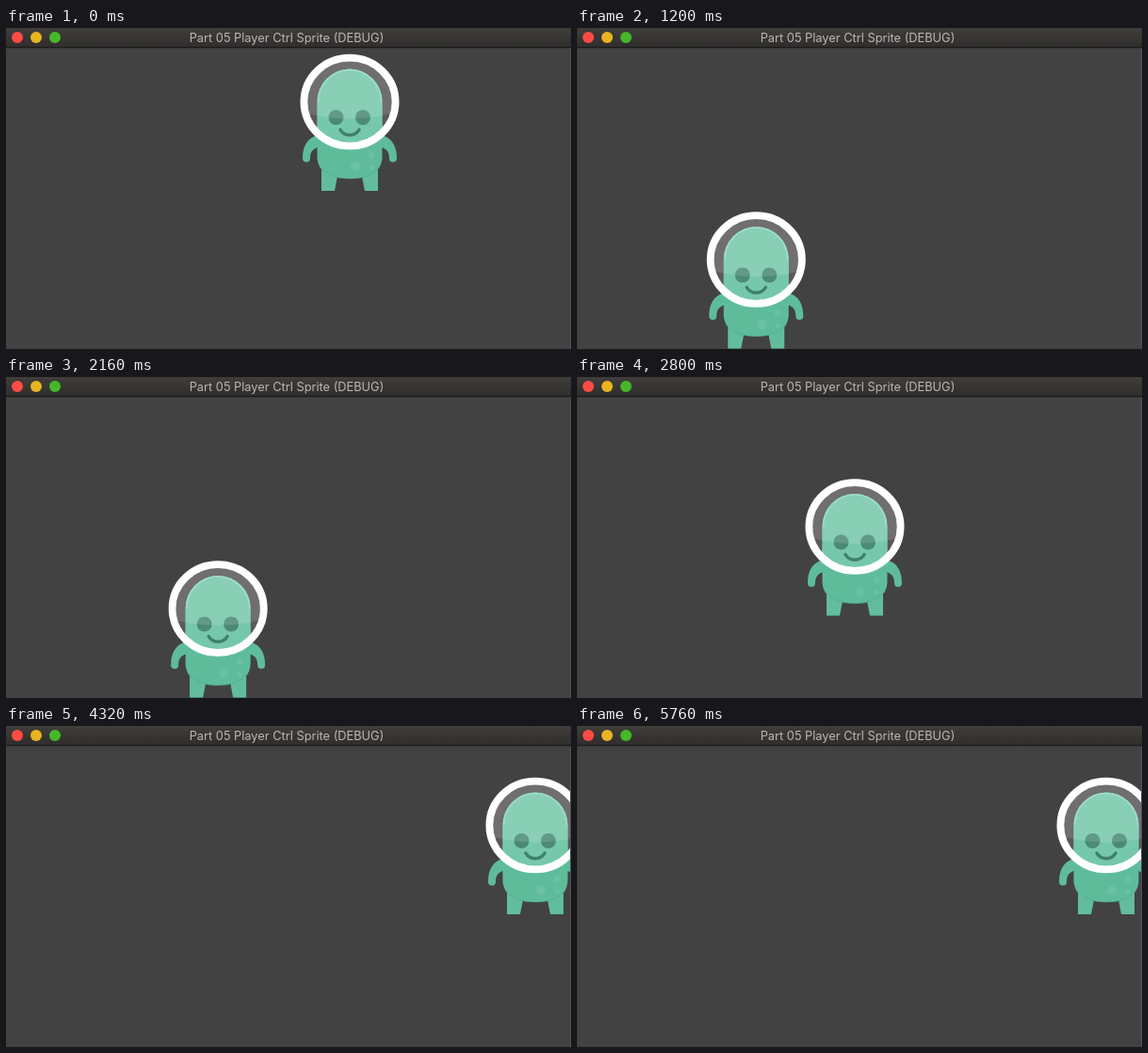
Animation of 600 by 341 pixels, one loop 5.84 s. Source, as an HTML page:

```html
<!DOCTYPE html>
<html lang="en">
<head>
<meta charset="utf-8">
<title>Player sprite</title>
<style>
  html, body { margin: 0; width: 100%; height: 100%; overflow: hidden; background: #424242; }
  svg { display: block; width: 600px; height: 341px; }
  text { font: 12.8px Inter, sans-serif; fill: #bab7b5; text-anchor: middle; }
</style>
</head>
<body>
<svg viewBox="0 0 600 341">
  <defs>
    <linearGradient id="bar" x2="0" y2="1">
      <stop stop-color="#403d3b"/>
      <stop offset="1" stop-color="#302e2c"/>
    </linearGradient>
    <clipPath id="glass"><ellipse rx="46" ry="45"/></clipPath>
    <path id="arm" d="M-33 35C-45 38-50 47-50 60A4 4 0 0 0-42 60C-42 54-40 50-33 48Z" fill="#5fbc9b"/>
    <path id="leg" d="M-30 66H-10.5L-16 94.5H-30Z" fill="#62bd9d"/>
  </defs>
  <rect width="600" height="341" fill="#424242"/>

  <!-- origin is the centre of the helmet -->
  <g id="player">
    <ellipse rx="48" ry="47" fill="#5b5858"/>
    <use href="#arm"/>
    <use href="#arm" transform="scale(-1 1)"/>
    <use href="#leg"/>
    <use href="#leg" transform="scale(-1 1)"/>
    <path d="M-34.5 0A34.5 35 0 0 1 34.5 0V58C34.5 74 21 81.5 0 81.5S-34.5 74-34.5 58Z" fill="#5fbc9b"/>
    <path d="M-32 69Q-22 81.5 0 81.5T32 69" fill="none" stroke="#51a78a" stroke-opacity=".6"/>
    <g fill="#83cbb2" opacity=".35">
      <circle cx="6" cy="69" r="5"/>
      <circle cx="23" cy="57" r="3.5"/>
      <circle cx="23" cy="70" r="2.5"/>
    </g>
    <g clip-path="url(#glass)">
      <path d="M-34.5 0A34.5 35 0 0 1 34.5 0V52H-34.5Z" fill="#76c8ab"/>
      <path d="M-33.5 0A33.5 34 0 0 1 33.5 0" fill="none" stroke="#94d8c0" stroke-width="1.5"/>
      <g fill="#4b8a76">
        <circle cx="-14.5" cy="16.5" r="8"/>
        <circle cx="14" cy="16.5" r="8"/>
      </g>
      <path d="M-10 29.5C-6 37 6 37 10 29.5" fill="none" stroke="#3f8069" stroke-width="3.5" stroke-linecap="round"/>
      <path d="M-50-50H50V11Q0 25-50 11Z" fill="#fff" opacity=".13"/>
    </g>
    <ellipse rx="48.6" ry="46.9" fill="none" stroke="#fff" stroke-width="7.8"/>
  </g>

  <rect x="599" y="21" width="1" height="320" fill="#555"/>
  <rect width="600" height="20" fill="url(#bar)"/>
  <rect y="20" width="600" height="1.3" fill="#1b1a1a"/>
  <circle cx="12" cy="10" r="6" fill="#ff4b46"/>
  <circle cx="32" cy="10" r="6" fill="#e8b421"/>
  <circle cx="52" cy="10" r="6" fill="#45b829"/>
  <text x="298" y="15">Part 05 Player Ctrl Sprite (DEBUG)</text>
</svg>
<script>
  const LOOP = 5840, STEP = 80;
  const start = { x: 365, y: 78.5 };
  // Key presses: axis, destination, start and end in ms
  const moves = [
    ['y', 246, 320, 720],
    ['x', 50.5, 800, 1520],
    ['x', 295, 1760, 2320],
    ['y', 159, 2400, 2640],
    ['x', 435.5, 2960, 3280],
    ['y', 105.5, 3360, 3520],
    ['x', 562, 3760, 4080]
  ];
  const player = document.getElementById('player');

  function positionAt(time) {
    const pos = { ...start };
    for (const [axis, to, begin, end] of moves) {
      const progress = Math.min(1, Math.max(0, (time - begin) / (end - begin)));
      pos[axis] += (to - pos[axis]) * progress;
    }
    return pos;
  }

  function draw() {
    const time = Math.floor(performance.now() % LOOP / STEP) * STEP;
    const { x, y } = positionAt(time);
    player.setAttribute('transform', `translate(${x} ${y})`);
    requestAnimationFrame(draw);
  }
  draw();
</script>
</body>
</html>
```
